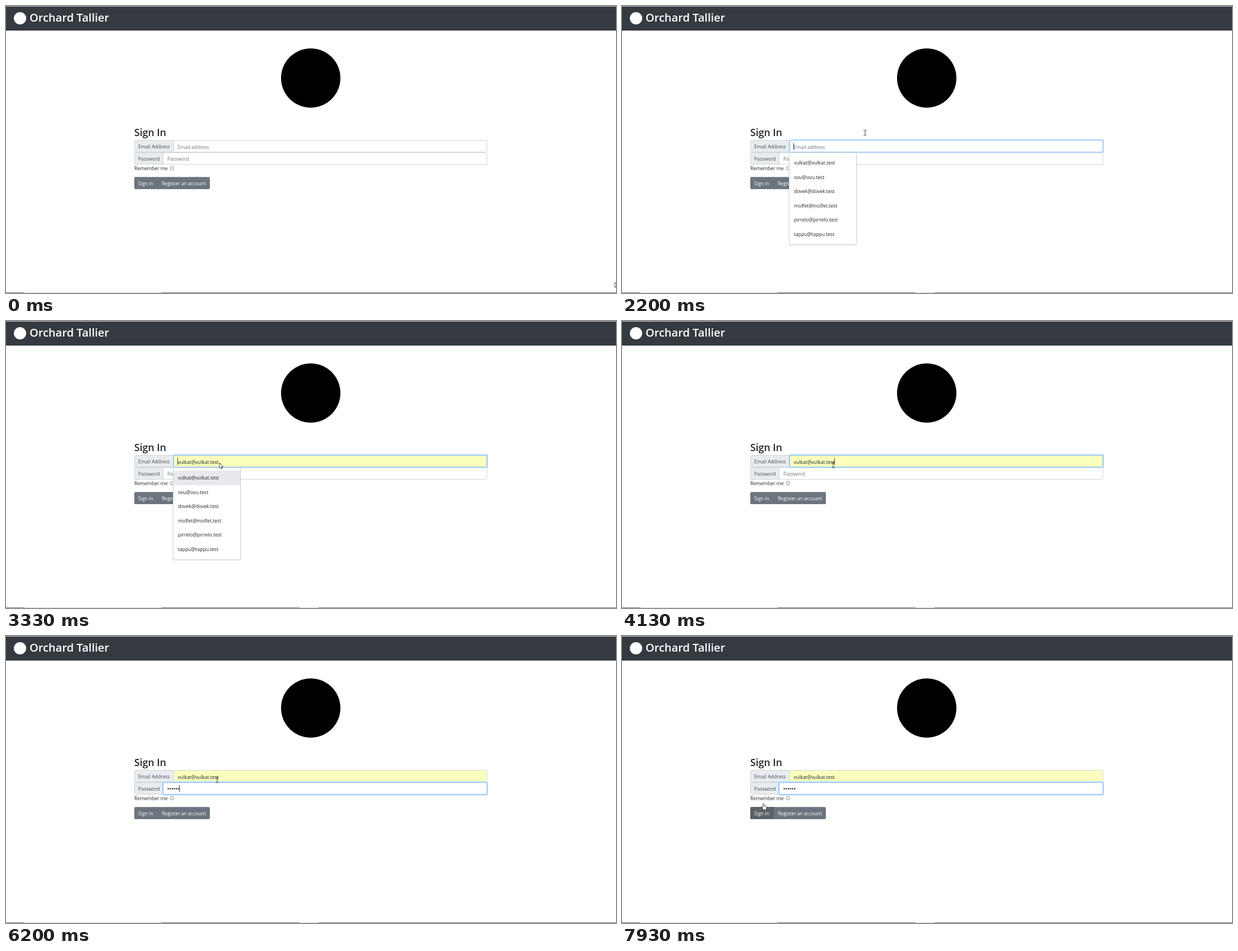
These frames come from a looping animation (1089 px wide and 514 px high, 8000 ms). An HTML page:

```html
<!DOCTYPE html>
<html lang="en">
<head>
<meta charset="utf-8">
<title>Sign in</title>
<style>
  html, body { margin: 0; width: 100%; height: 100%; overflow: hidden; background: #fff; }
  svg { display: block; width: 100vw; height: 100vh; }
  text { font: 8.6px "Open Sans", "Noto Sans", sans-serif; fill: #495057; white-space: pre; }
  .brand { font-size: 20px; font-weight: 600; fill: #fff; }
  .heading { font-size: 17.7px; font-weight: 600; fill: #212529; }
  .hint { fill: #6c757d; }
  .dark { fill: #212529; }
  .light { fill: #fff; }
  .line { fill: none; stroke: #ced4da; }
</style>
</head>
<body>
<svg viewBox="0 0 1089 514" preserveAspectRatio="none">
  <rect width="1089" height="514" fill="#fff"/>
  <rect width="1089" height="44" fill="#343a40"/>
  <rect width="1089" height="1" fill="#d3d5d7"/>
  <circle cx="25" cy="22" r="11" fill="#fff"/>
  <text class="brand" x="42" y="28">Orchard Tallier</text>
  <circle cx="544" cy="129" r="53"/>

  <text class="heading" x="229" y="233">Sign In</text>
  <g id="emailRow">
    <rect x="229.5" y="240.5" width="629" height="21" rx="2.3" fill="#fff"/>
    <path d="M299.5 240.5H231.8a2.3 2.3 0 0 0-2.3 2.3v16.4a2.3 2.3 0 0 0 2.3 2.3H299.5z" fill="#e9ecef"/>
    <rect id="autofill" x="300" y="241" width="558" height="20" rx="1.5" fill="#faffbd"/>
    <rect class="line" x="229.5" y="240.5" width="629" height="21" rx="2.3"/>
    <path class="line" d="M299.5 240.5v21"/>
    <text x="236" y="255">Email Address</text>
  </g>
  <g id="passwordRow">
    <rect x="229.5" y="262.5" width="629" height="21" rx="2.3" fill="#fff"/>
    <path d="M280.5 262.5H231.8a2.3 2.3 0 0 0-2.3 2.3v16.4a2.3 2.3 0 0 0 2.3 2.3H280.5z" fill="#e9ecef"/>
    <rect class="line" x="229.5" y="262.5" width="629" height="21" rx="2.3"/>
    <path class="line" d="M280.5 262.5v21"/>
    <text x="236" y="276.6">Password</text>
  </g>
  <g id="emailGlow" fill="none">
    <rect x="298.3" y="239.4" width="561.4" height="23.2" rx="3" stroke="#bfdeff" stroke-width="2"/>
    <rect x="299.5" y="240.5" width="559" height="21" rx="1.5" stroke="#80bdff"/>
  </g>
  <g id="passwordGlow" fill="none">
    <rect x="279.3" y="261.3" width="580.4" height="23.4" rx="3" stroke="#bfdeff" stroke-width="2"/>
    <rect x="280.5" y="262.5" width="578" height="21" rx="1.5" stroke="#80bdff"/>
  </g>
  <text id="emailHint" class="hint" x="306.5" y="255.5">Email address</text>
  <text id="email" class="dark" x="306.5" y="255.5"></text>
  <text id="passwordHint" class="hint" x="288" y="277">Password</text>
  <g id="dots" fill="#212529"></g>

  <text class="dark" x="229" y="293.6">Remember me</text>
  <rect x="293.5" y="287.5" width="6" height="6" rx="1" fill="#e9e9e9" stroke="#a6a6a6"/>
  <rect x="229" y="306.3" width="135" height="21.7" rx="2.3" fill="#6c757d"/>
  <path id="hover" d="M271 306.3H231.3a2.3 2.3 0 0 0-2.3 2.3v17.1a2.3 2.3 0 0 0 2.3 2.3H271z" fill="#5a6268"/>
  <text class="light" x="236" y="320.6">Sign in</text>
  <text class="light" x="278" y="320.6">Register an account</text>

  <g id="menu">
    <rect x="298" y="263.5" width="121.5" height="165.5" rx="2.5" fill="#000" opacity=".07"/>
    <rect x="298.5" y="262.5" width="120" height="165" rx="2" fill="#fff" stroke="#ccced0"/>
    <rect id="picked" x="299" y="268" width="119" height="26" fill="#e8e9ed"/>
  </g>
  <rect id="caret" width="1" height="12.5" fill="#444"/>

  <rect y="513" width="1089" height="1" fill="#707070"/>
  <rect x="33" y="513" width="244" height="1" fill="#d6d6d6"/>
  <rect id="status" x="524" y="513" width="34" height="1" fill="#d6d6d6"/>

  <g id="cursor">
    <path id="arrow" d="M0 0V9.5L2.2 7.5 3.8 11 5.3 10.3 3.8 7H6.8Z" fill="#fff" stroke="#222" stroke-width=".8"/>
    <path id="beam" d="M-2.5-4.7h2m1 0h2M0-4.5V4.5M-2.5 4.7h2m1 0h2" fill="none" stroke="#222" stroke-width=".9"/>
    <path id="hand" d="M-1 1q1-1.6 2 0v3.6l3.8 1q1.1.4 1 1.6l-1 4.5H0L-3.3 7.3q.7-1.2 2.3.4z" fill="#fff" stroke="#222" stroke-width=".8"/>
  </g>
</svg>
<script>
const LOOP = 8000;
const TICK = 200 / 3;
const NS = "http://www.w3.org/2000/svg";
const ui = {};
document.querySelectorAll("[id]").forEach(el => ui[el.id] = el);

const names = ["vulkat", "ovu", "dovek", "molfet", "pirrelo", "tappu"];
const addresses = names.map(n => `${n}@${n}.test`);

// [time, x, y]
const path = [
  [0, 1087, 495], [667, 1087, 495], [933, 721, 323],
  [1067, 721, 323], [1267, 472, 230],
  [1467, 472, 230], [1800, 434, 227],
  [3000, 434, 227], [3333, 381, 254], [3533, 377, 258],
  [6867, 377, 258], [7200, 315, 251], [7533, 262, 288],
  [7733, 240, 307], [7800, 245, 306], [7933, 252.5, 299.5]
];
// [from, shape]
const shapes = [[0, "arrow"], [1260, "beam"], [3260, "arrow"], [4130, "beam"], [7330, "arrow"], [7660, "hand"]];
const typed = [5330, 5600, 5730, 5870, 6000, 6200];
const DOT_STEP = 3.7;
const EMAIL_CARET_Y = 245.3;
const PASSWORD_CARET_Y = 267;

function add(parent, tag, attrs, text = "") {
  const el = document.createElementNS(NS, tag);
  for (const key in attrs) el.setAttribute(key, attrs[key]);
  el.textContent = text;
  parent.append(el);
  return el;
}

addresses.forEach((a, i) => add(ui.menu, "text", { class: "dark", x: 307, y: 284.3 + i * 25.5 }, a));
const dots = typed.map((_, i) => add(ui.dots, "circle", { cx: 289.7 + i * DOT_STEP, cy: 273.6, r: 1.25 }));
ui.email.textContent = addresses[0];

const within = (t, a, b) => t >= a && t < b;
const fade = (el, value) => el.setAttribute("opacity", value);
const show = (el, on) => fade(el, on ? 1 : 0);

function position(t) {
  const i = path.findIndex(p => p[0] > t);
  if (i < 0) return path[path.length - 1].slice(1);
  const [t0, x0, y0] = path[i - 1];
  const [t1, x1, y1] = path[i];
  const k = (t - t0) / (t1 - t0);
  return [x0 + (x1 - x0) * k, y0 + (y1 - y0) * k];
}

function caretAt(t, count) {
  if (within(t, 2200, 2600) || within(t, 3000, 3470) || within(t, 3930, 4130)) return [306, EMAIL_CARET_Y];
  if (within(t, 4130, 4670)) return [Math.floor(306 + ui.email.getComputedTextLength()), EMAIL_CARET_Y];
  if (within(t, 4670, 5330)) return [288, PASSWORD_CARET_Y];
  if (within(t, 5400, 6730) || within(t, 7270, 7800)) return [Math.floor(288 + count * DOT_STEP - .4), PASSWORD_CARET_Y];
  return null;
}

function draw(t) {
  const filled = t >= 3260;
  show(ui.autofill, filled);
  show(ui.email, filled);
  show(ui.emailHint, !filled);
  show(ui.menu, within(t, 2200, 4130));
  show(ui.picked, within(t, 3260, 4130));
  show(ui.status, t >= 2200);

  fade(ui.emailGlow, t < 2200 ? 0 : t < 2270 ? .8 : t < 4870 ? 1 : t < 4930 ? .5 : 0);
  fade(ui.passwordGlow, t < 4870 ? 0 : t < 4930 ? .5 : 1);
  fade(ui.hover, t < 7800 ? 0 : t < 7870 ? .4 : t < 7930 ? .8 : 1);

  const count = typed.filter(at => t >= at).length;
  show(ui.passwordHint, count === 0);
  dots.forEach((dot, i) => show(dot, i < count));

  const caret = caretAt(t, count);
  show(ui.caret, caret);
  if (caret) {
    ui.caret.setAttribute("x", caret[0]);
    ui.caret.setAttribute("y", caret[1]);
  }

  const [x, y] = position(Math.floor((t + 4) / TICK) * TICK);
  ui.cursor.setAttribute("transform", `translate(${x.toFixed(1)} ${y.toFixed(1)})`);
  const shape = shapes.filter(s => t >= s[0]).pop()[1];
  for (const id of ["arrow", "beam", "hand"]) show(ui[id], id === shape);
}

const start = performance.now();
function frame() {
  draw((performance.now() - start) % LOOP);
  requestAnimationFrame(frame);
}
frame();
</script>
</body>
</html>
```
